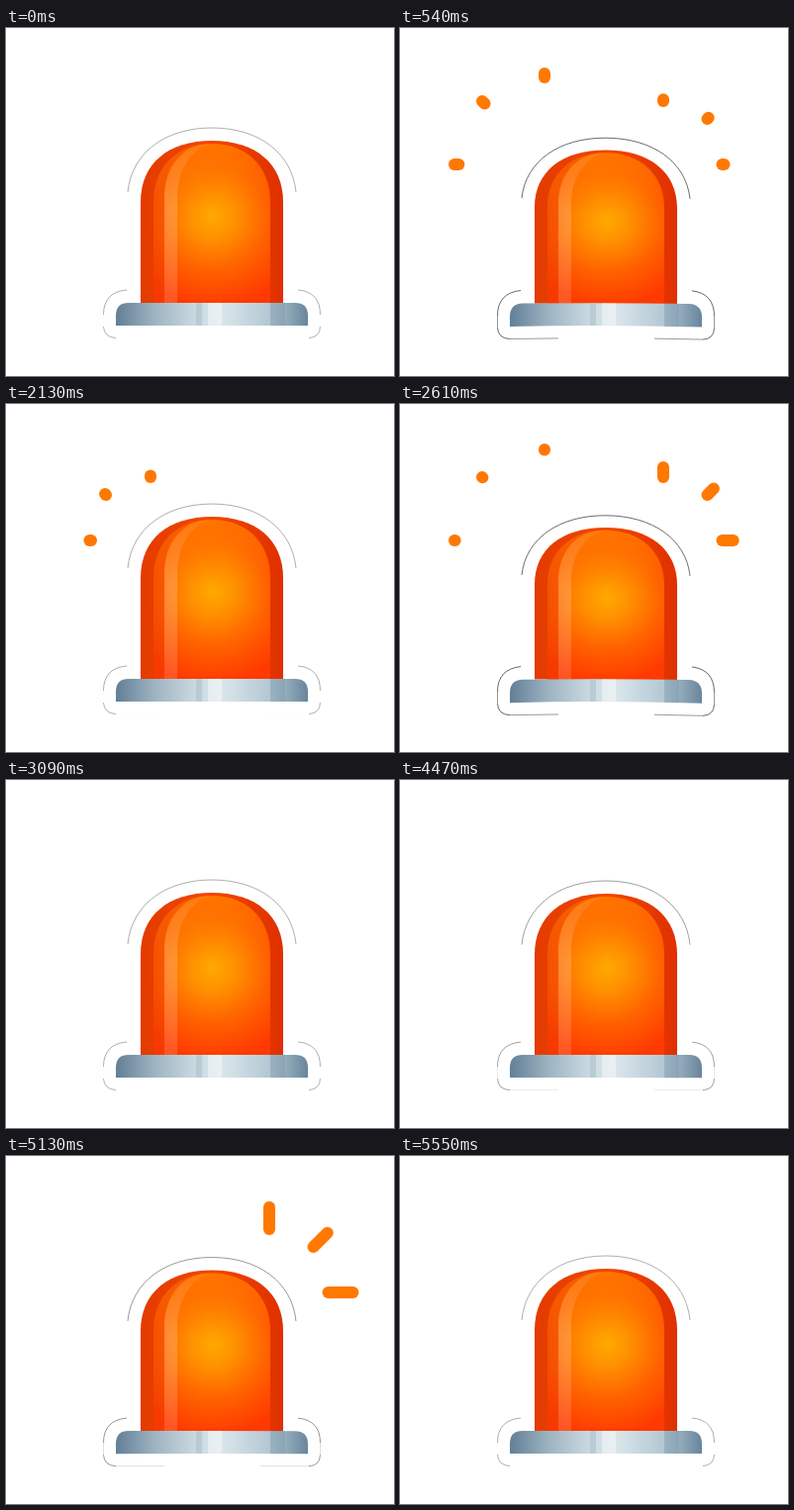
Animation of 392x352 px, one loop 6.33 s. Source, as an HTML page:

```html
<!DOCTYPE html>
<html lang="en">
<head>
<meta charset="utf-8">
<title>Siren</title>
<style>
  html, body { margin: 0; width: 100%; height: 100%; overflow: hidden; background: #fff; }
  svg { display: block; width: 392px; height: 352px; }
  .outline { fill: none; stroke: #000; stroke-width: .8; }
</style>
</head>
<body>
<svg viewBox="0 0 392 352">
  <defs>
    <linearGradient id="shell" x1="136" x2="280" y1="0" y2="0" gradientUnits="userSpaceOnUse">
      <stop offset="0" stop-color="#e33b00"/>
      <stop offset=".5" stop-color="#f24600"/>
      <stop offset="1" stop-color="#df3000"/>
    </linearGradient>
    <radialGradient id="glow" cx="209" cy="190" r="92" gradientUnits="userSpaceOnUse">
      <stop offset="0" stop-color="#ffa900"/>
      <stop offset=".25" stop-color="#ff9000"/>
      <stop offset=".6" stop-color="#ff6200"/>
      <stop offset="1" stop-color="#ff3a00"/>
    </radialGradient>
    <linearGradient id="warmTop" x1="200" y1="114" x2="212" y2="180" gradientUnits="userSpaceOnUse">
      <stop offset="0" stop-color="#ff8000" stop-opacity=".8"/>
      <stop offset="1" stop-color="#ff8000" stop-opacity="0"/>
    </linearGradient>
    <linearGradient id="shine" x1="0" y1="117" x2="0" y2="278" gradientUnits="userSpaceOnUse">
      <stop offset="0" stop-color="#fff" stop-opacity=".06"/>
      <stop offset=".4" stop-color="#fff" stop-opacity=".2"/>
      <stop offset="1" stop-color="#fff" stop-opacity=".14"/>
    </linearGradient>
    <linearGradient id="metal" x1="111" x2="305" y1="0" y2="0" gradientUnits="userSpaceOnUse">
      <stop offset="0" stop-color="#627f97"/>
      <stop offset=".2" stop-color="#9db3c1"/>
      <stop offset=".42" stop-color="#cbdae1"/>
      <stop offset=".55" stop-color="#dbe6eb"/>
      <stop offset=".8" stop-color="#b3c8d4"/>
      <stop offset="1" stop-color="#68859c"/>
    </linearGradient>
    <clipPath id="baseClip"><path id="baseClipPath"/></clipPath>
  </defs>

  <g id="dome">
    <path fill="url(#shell)" d="M136 279V176C136 137 164 114 208 114S280 137 280 176V279Z"/>
    <path fill="url(#glow)" d="M149 279V176C149 139 174 117 208 117S267 139 267 176V279Z"/>
    <path fill="url(#warmTop)" d="M149 180V176C149 139 174 117 208 117S267 139 267 176V180Z"/>
    <path fill="#e63800" fill-opacity=".35" d="M149 279V176C149 143 168 122 197 118C174 123 160 143 160 172V279Z"/>
    <path fill="url(#shine)" d="M160 279V172C160 142 178 117 208 117C188 121 173 143 173 172V279Z"/>
    <path class="outline" d="M123 166C127 126 161 101 208 101S289 126 293 166"/>
  </g>

  <g clip-path="url(#baseClip)">
    <rect x="105" y="270" width="206" height="40" fill="url(#metal)"/>
    <path fill="#7e99ac" fill-opacity=".45" d="M267 270h15v40h-15Z"/>
    <path fill="#a9bfcc" fill-opacity=".55" d="M192 270h6v40h-6Z"/>
    <path fill="#fff" fill-opacity=".4" d="M204 270h14v40h-14Z"/>
  </g>
  <path id="corners" class="outline"/>
  <path id="edges" class="outline"/>
  <g id="rays" stroke="#ff7800" stroke-width="12" stroke-linecap="round"></g>
</svg>
<script>
const LOOP = 6330;
const RAY_STARTS = [84, 2127, 4579];
const SQUASH_STARTS = [20, 2130, 4455];
const RAY_LIFE = 500, RIGHT_DELAY = 452, SQUASH_TIME = 700;
const GROUND = 278;

const byId = id => document.getElementById(id);
const clamp = v => Math.min(1, Math.max(0, v));
const easeOut = v => 1 - (1 - v) ** 4;
const easeInOut = v => (1 - Math.cos(Math.PI * v)) / 2;

// Each ray runs from its inner end to its outer end.
const rays = [
  [86, 138, 55, 138, 0], [101, 92, 83, 74, 0], [146, 74, 146, 46, 0],
  [266, 74, 266, 46, RIGHT_DELAY], [310.5, 92, 328.5, 74, RIGHT_DELAY], [325.5, 138, 357, 138, RIGHT_DELAY]
].map(([x1, y1, x2, y2, delay]) => {
  const line = byId('rays').appendChild(document.createElementNS('http://www.w3.org/2000/svg', 'line'));
  return { line, x1, y1, x2, y2, delay };
});

function age(time, starts, delay, life) {
  const start = starts.find(s => time >= s + delay && time < s + delay + life);
  return start === undefined ? -1 : time - start - delay;
}

function drawRay({ line, x1, y1, x2, y2, delay }, time) {
  const t = age(time, RAY_STARTS, delay, RAY_LIFE);
  line.style.display = t < 0 ? 'none' : '';
  if (t < 0) return;
  const head = easeOut(clamp(t / 308));
  const tail = easeInOut(clamp((t - 325) / (RAY_LIFE - 325)));
  const put = (n, p) => {
    line.setAttribute('x' + n, x1 + (x2 - x1) * p);
    line.setAttribute('y' + n, y1 + (y2 - y1) * p);
  };
  put(1, tail);
  put(2, head);
}

function drawSiren(time) {
  const t = age(time, SQUASH_STARTS, 0, SQUASH_TIME);
  const s = t < 0 ? 0 : Math.sin(Math.PI * t / SQUASH_TIME);
  const scale = 1 - .08 * s, skew = .006 * s;
  byId('dome').setAttribute('transform',
    `matrix(1 ${skew} 0 ${scale} 0 ${GROUND * (1 - scale) - 208 * skew})`);

  // The base droops towards its two ends.
  const l = 1.4 * s, r = 2.2 * s;
  byId('baseClipPath').setAttribute('d',
    `M111 ${301 + l}V${291 + l}Q111 ${278 + l} 124 ${278 + l * .6}Q208 ${278 - s * .6} 292 ${278 + r * .6}
     Q305 ${278 + r} 305 ${291 + r}V${301 + r}Q208 ${301 - s * 1.6} 111 ${301 + l}Z`);
  byId('corners').setAttribute('d',
    `M122 ${265 + l * .5}Q98.5 ${267 + l} 98.5 ${290 + l}M98.5 ${302 + l}Q99 ${313 + l} 111 ${313.5 + l}
     M295 ${265 + r * .5}Q317.5 ${267 + r} 317.5 ${290 + r}M317.5 ${302 + r}Q317 ${313 + r} 306 ${313.5 + r}`);
  byId('edges').setAttribute('d',
    `M98.5 ${290 + l}V${302 + l}M317.5 ${290 + r}V${302 + r}
     M111 ${313.5 + l}Q135 ${313.5 + l * .7} 160 ${313.5 + l * .4}M306 ${313.5 + r}Q282 ${313.5 + r * .7} 257 ${313.5 + r * .4}`);
  const strength = .4 + .35 * Math.min(1, s * 3);
  document.querySelectorAll('.outline').forEach(path => path.style.opacity = strength);
  byId('edges').style.opacity = .5 * Math.min(1, s * 3);
}

function frame() {
  const time = performance.now() % LOOP;
  drawSiren(time);
  rays.forEach(ray => drawRay(ray, time));
  requestAnimationFrame(frame);
}
frame();
</script>
</body>
</html>
```
